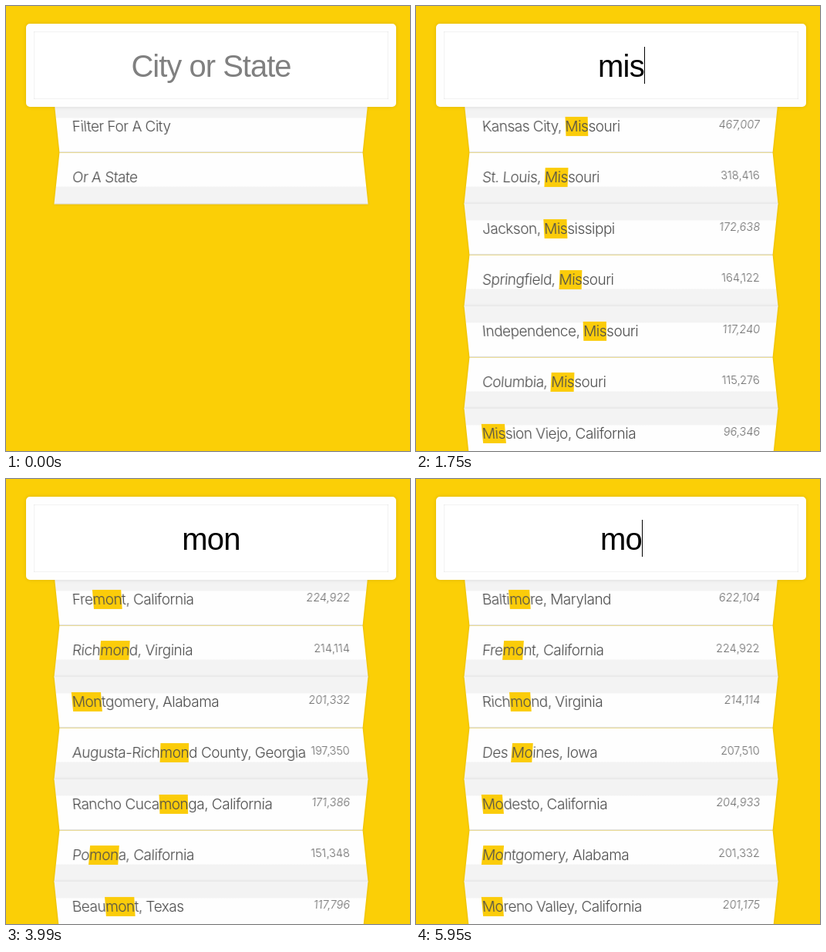
Write an HTML page that moves like this. It is 524 by 578 pixels and loops after 6.02 s.

```html
<!DOCTYPE html>
<html lang="en">
<head>
<meta charset="utf-8">
<title>City or State</title>
<style>
  html, body { margin: 0; width: 100%; height: 100%; overflow: hidden; }
  #stage {
    position: relative; width: 524px; height: 578px; overflow: hidden;
    background: #fbcf06; font-family: Inter, "Liberation Sans", sans-serif;
    font-optical-sizing: none;
  }
  #field {
    position: absolute; z-index: 2; left: 26px; top: 23px; width: 480px; height: 108px;
    box-sizing: border-box; border: 10px solid #fefefe; border-radius: 5px; background: #fff;
    box-shadow: 0 0 5px rgba(0,0,0,.12), inset 0 0 2px rgba(0,0,0,.19);
    font: 40px/48px "Liberation Sans", sans-serif; text-align: center; white-space: pre;
  }
  #query { position: relative; display: inline-block; top: 21px; letter-spacing: -.8px; }
  #query.empty { color: #808080; letter-spacing: -1px; }
  #caret { position: absolute; top: 20px; width: 1px; height: 48px; background: #000; }
  .row {
    position: absolute; left: 66px; width: 400px; height: 66.5px; box-sizing: border-box;
    padding: 0 20px; border-bottom: 1px solid #dcdcdc; box-shadow: 0 0 3px rgba(0,0,0,.12);
    white-space: pre; font-size: 19px; line-height: 66.5px; font-weight: 300;
    letter-spacing: -.5px; color: #4c4c4c;
  }
  .down { background: linear-gradient(#f3f3f3 32%, #fefefe 33%); transform: perspective(100px) rotateX(-3deg); }
  .up { background: linear-gradient(#fefefe 67%, #f3f3f3 68%); transform: perspective(100px) rotateX(3deg); }
  .hit { background: #fbcc0a; padding: 1px 0; }
  .count {
    position: absolute; right: 20px; top: -3px; font-size: 14.5px; letter-spacing: 0; color: #6a6a6a;
  }
</style>
</head>
<body>
<div id="stage">
  <div id="list"></div>
  <div id="field"><span id="query"></span><i id="caret"></i></div>
</div>
<script>
const LOOP = 6020, LAG = 140, PITCH = 66.5, TOP = 123.5;

const cities = `Columbus, Ohio|822,553
Detroit, Michigan|688,701
Memphis, Tennessee|653,450
Washington, District Of Columbia|646,449
Boston, Massachusetts|645,966
Baltimore, Maryland|622,104
Oklahoma City, Oklahoma|610,613
Milwaukee, Wisconsin|599,164
Kansas City, Missouri|467,007
Miami, Florida|417,650
Minneapolis, Minnesota|400,070
St. Louis, Missouri|318,416
St. Paul, Minnesota|294,873
Fremont, California|224,922
Richmond, Virginia|214,114
Des Moines, Iowa|207,510
Modesto, California|204,933
Montgomery, Alabama|201,332
Moreno Valley, California|201,175
Augusta-Richmond County, Georgia|197,350
Jackson, Mississippi|172,638
Rancho Cucamonga, California|171,386
Springfield, Missouri|164,122
Pomona, California|151,348
Beaumont, Texas|117,796
Independence, Missouri|117,240
El Monte, California|115,708
Columbia, Missouri|115,276
Billings, Montana|109,059
Mission Viejo, California|96,346
Missoula, Montana|69,122
Montebello, California|63,495
Great Falls, Montana|59,351
Bozeman, Montana|39,860`.split("\n").map(line => line.split("|"));

// [time, word, typed length]
const keys = [
  [0, "miss", 0], [140, "miss", 1], [350, "miss", 2], [560, "miss", 3], [910, "miss", 4],
  [1610, "miss", 3], [1820, "miss", 2], [2030, "miss", 1], [2380, "miss", 0],
  [3290, "montana", 1], [3430, "montana", 2], [3570, "montana", 3], [4200, "montana", 4],
  [4550, "montana", 5], [4830, "montana", 6], [4970, "montana", 7], [5180, "montana", 6],
  [5320, "montana", 5], [5460, "montana", 4], [5600, "montana", 3], [5740, "montana", 2]
];
const caretOff = [[0, 140], [1400, 1610], [2730, 3220], [3920, 4410]];

const $ = id => document.getElementById(id);
const stage = $("stage"), list = $("list"), query = $("query"), caret = $("caret");

function textAt(t) {
  let text = "";
  for (const [time, word, n] of keys) if (time <= t) text = word.slice(0, n);
  return text;
}

function row(name, count, i) {
  const side = i % 2 ? "up" : "down";
  return `<div class="row ${side}" style="top:${TOP + i * PITCH}px">${name}` +
    (count ? `<span class="count">${count}</span>` : "") + "</div>";
}

function listHtml(text) {
  if (!text) return row("Filter For A City", "", 0) + row("Or A State", "", 1);
  const found = cities.filter(c => c[0].toLowerCase().includes(text)).slice(0, 7);
  const mark = new RegExp(text, "gi");
  return found.map(([name, count], i) =>
    row(name.replace(mark, m => `<span class="hit">${m}</span>`), count, i)).join("");
}

let shownText = null, shownList = null;

function draw(t) {
  const text = textAt(t), filter = textAt(t - LAG);
  if (text !== shownText) {
    shownText = text;
    query.textContent = text || "City or State";
    query.className = text ? "" : "empty";
    const end = text ? 230 + query.getBoundingClientRect().width / 2 : 229;
    caret.style.left = Math.round(end) + "px";
  }
  if (filter !== shownList) {
    shownList = filter;
    list.innerHTML = listHtml(filter);
    stage.style.background = filter.startsWith("monta") ? "#f8cd07" : "#fbcf06";
  }
  const off = caretOff.some(([a, b]) => t >= a && t < b);
  caret.style.visibility = off ? "hidden" : "visible";
}

const start = performance.now();
function tick(now) {
  draw(Math.max(0, now - start) % LOOP);
  requestAnimationFrame(tick);
}
draw(0);
requestAnimationFrame(tick);
</script>
</body>
</html>
```
